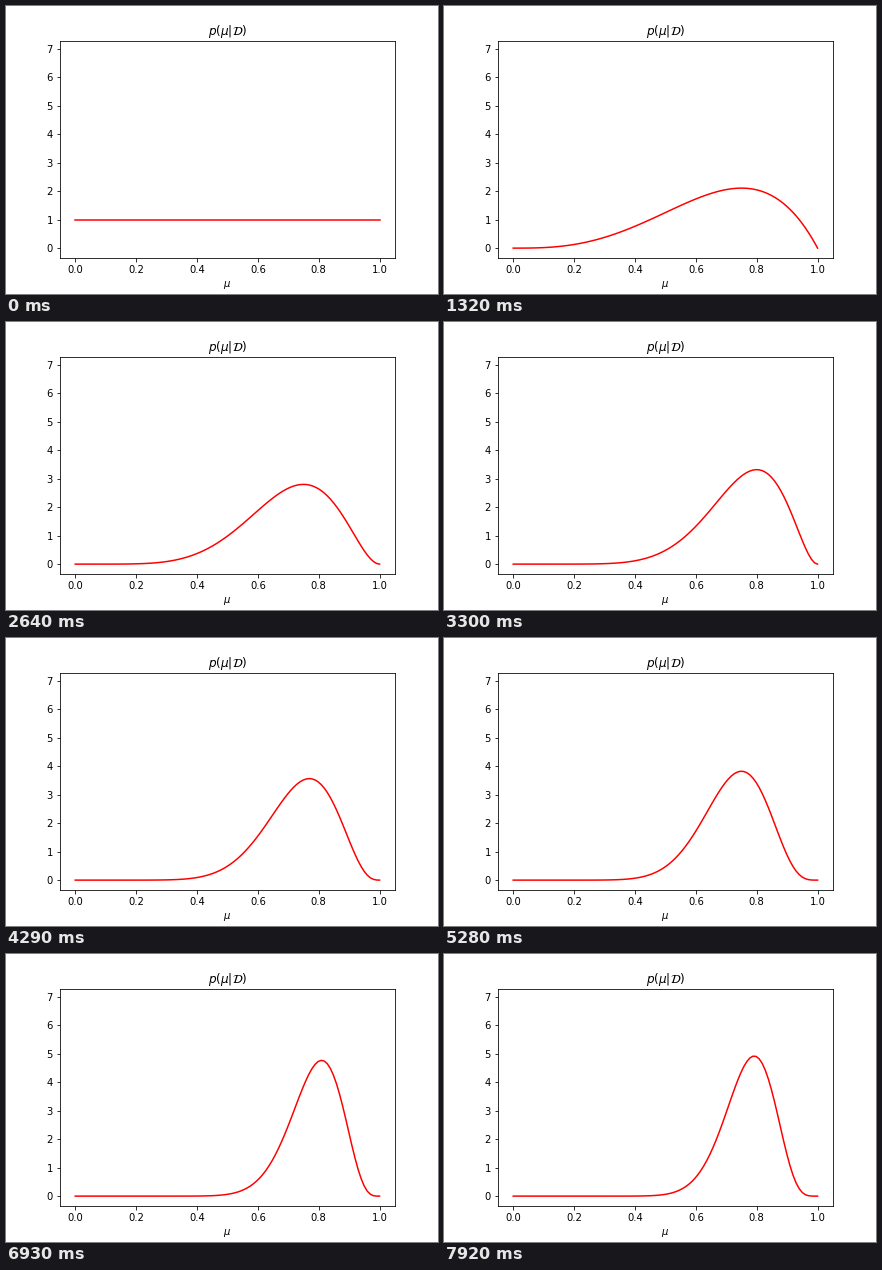
A matplotlib script that plays this animation: 432 by 288 pixels, repeating every 8 s.

```python
from math import comb

import numpy as np
import matplotlib.pyplot as plt
from matplotlib.animation import FuncAnimation

FLIPS = "HHHTHTHHHHTHHHHTHHHHHHHT"
HOLD = 330       # ms between coin flips
LOOP = 8000      # ms
STEP = 20        # ms per animation frame
Y_MAX = 6.95

mu = np.linspace(0, 1, 100)


def posterior(n):
    """Density of mu after n flips, starting from a uniform prior."""
    heads = FLIPS[:n].count("H")
    scale = (n + 1) * comb(n, heads)
    return scale * mu**heads * (1 - mu)**(n - heads)


curves = [posterior(n) for n in range(len(FLIPS) + 1)]

fig, ax = plt.subplots(figsize=(6, 4), dpi=72, facecolor="white")
fig.subplots_adjust(left=0.125, right=0.9, bottom=0.125, top=0.88)
ax.set_xlim(-0.05, 1.05)
ax.set_ylim(-0.05 * Y_MAX, 1.05 * Y_MAX)
ax.set_yticks(range(8))
ax.set_title(r"$p(\mu|\mathcal{D})$")
ax.set_xlabel(r"$\mu$")
line, = ax.plot(mu, curves[0], color="red", lw=1.5)


def update(i):
    # Half a step of lead keeps each flip on time despite the coarser clock.
    flips = (i * STEP + STEP // 2) // HOLD
    line.set_ydata(curves[flips])
    return line,


def reset():
    return update(0)


anim = FuncAnimation(fig, update, frames=LOOP // STEP, init_func=reset,
                     interval=STEP, repeat=True, repeat_delay=0)
plt.show()
```
